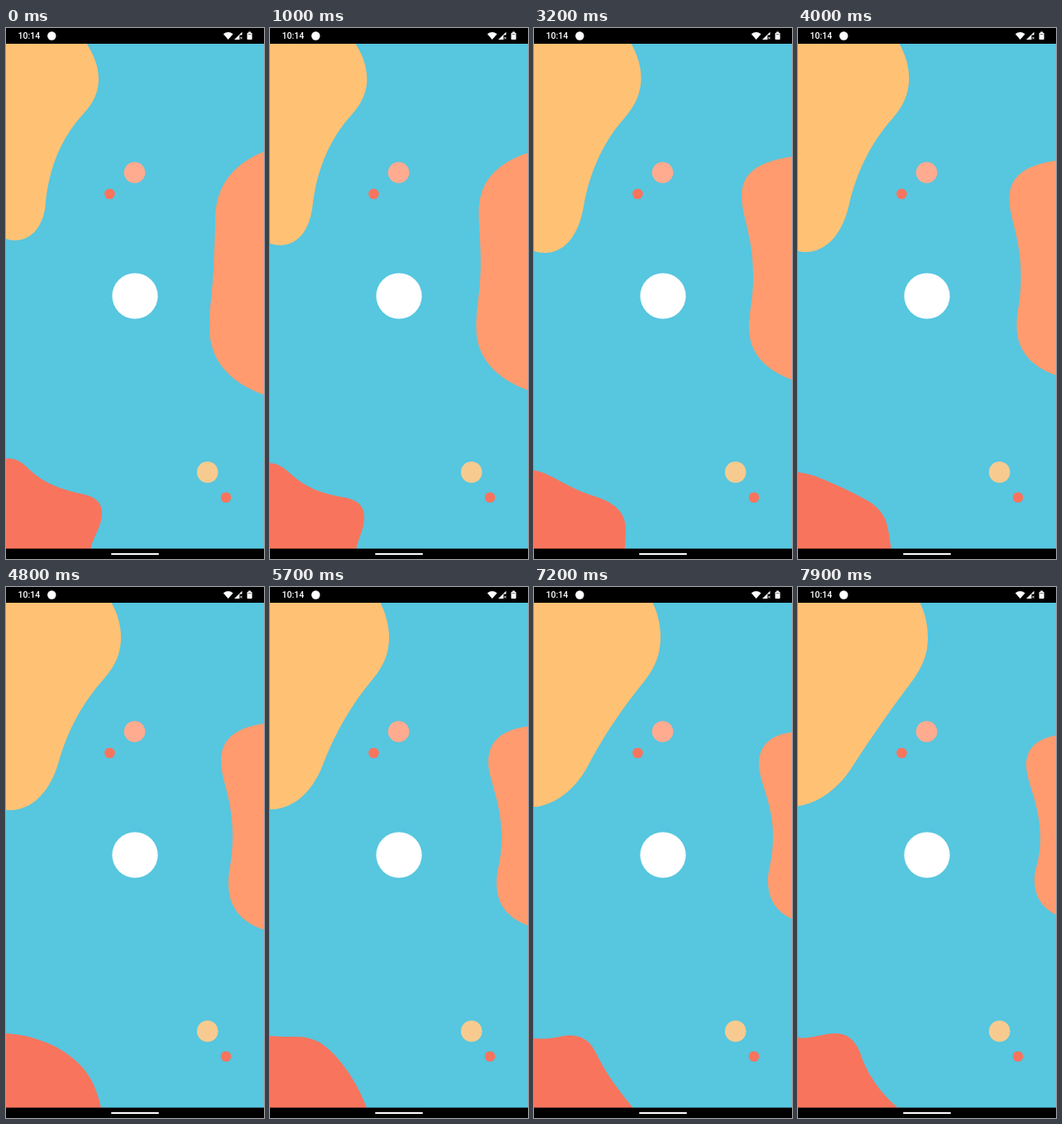
Write an HTML page that moves like this. It is 312 px wide and 640 px high and loops after 8 s.

```html
<!DOCTYPE html>
<html lang="en">
<head>
<meta charset="utf-8">
<title>Splash screen</title>
<style>
html, body { margin: 0; width: 100%; height: 100%; overflow: hidden; background: #57c6df; }
svg { display: block; width: 100%; height: 100%; }
.time { font: 500 10.5px Roboto, sans-serif; fill: #fff; }
.red { fill: #f9745d; }

/* Shapes advance in 100 ms ticks. */
.blob { animation: 8s infinite; }
.sun { fill: #ffc274; animation-name: sun; }
.peach { fill: #ff9b6e; animation-name: peach; }
.coral { fill: #f9745d; animation-name: coral; }

@keyframes sun {
  0% { animation-timing-function: steps(19);
    d: path("M0 18L97 18C106 32 112 46 112 62C112 78 105 91 94 103C66 133 52 170 48 210C46 238 32 256 10 256C6 256 3 255 0 254Z"); }
  23.75% { animation-timing-function: steps(13);
    d: path("M0 18L108 18C117 32 122 46 122 62C122 78 115 92 104 105C76 136 61 173 55 215C51 247 36 267 14 267C9 267 4 266 0 265Z"); }
  40% { animation-timing-function: steps(16);
    d: path("M0 18L117 18C125 32 129.5 46 129.5 60C129.5 79 122 94 109 109C83 138 67 175 60 215C54 250 37 271 13 271C8 271 4 270 0 269Z"); }
  60% { animation-timing-function: steps(9);
    d: path("M0 18L127 18C135 32 139 46 139 61C139 80 132 95 119 110C92 140 75 172 63 213C53 247 31 269 5 269C3 269 2 269 0 268.5Z"); }
  71.25% { animation-timing-function: steps(15);
    d: path("M0 18L133 18C140 32 144 46 144 61C144 80 137 96 125 110C99 141 79 175 64 214C52 246 30 266 4 268C3 268 1 268 0 268Z"); }
  90% { animation-timing-function: steps(7);
    d: path("M0 18L143 18C150 32 153 46 153 61C153 80 147 97 133 114C106 147 84 180 66 214C52 242 28 261 3 265C2 265 1 265 0 265Z"); }
  98.75%, 100% {
    d: path("M0 18L147 18C154 32 157 46 157 62C157 81 150 97 139 112C112 148 88 182 68 213C52 240 28 259 3 263.5C2 264 1 264 0 264Z"); }
}

@keyframes peach {
  0% { animation-timing-function: steps(19);
    d: path("M312 149C275 164 253 190 253 231C253 250 252 262 251 290C249 325 246 335 246 361C246 400 270 427 312 442Z"); }
  23.75% { animation-timing-function: steps(13);
    d: path("M312 152C273 162 252 182 252 213C252 232 258 255 258 290C258 325 252.5 335 252.5 361C252.5 396 276 418 312 432Z"); }
  40% { animation-timing-function: steps(16);
    d: path("M312 155C270 161 251 176 251 202C251 227 265 250 265 300C265 330 260 340 260 361C260 392 280 412 312 424Z"); }
  60% { animation-timing-function: steps(9);
    d: path("M312 164.5C276 170 260 184 260 210C260 232 274 255 274 300C274 330 269 340 269 357C269 386 284 404 312 413Z"); }
  71.25% { animation-timing-function: steps(15);
    d: path("M312 168C280 172 264 186 264 211C264 232 280 258 280 302C280 332 274 338 274 357C274 383 288 399 312 408Z"); }
  90% { animation-timing-function: steps(7);
    d: path("M312 175C285 178 272 192 272 213C272 235 289 260 289 300C289 330 283 338 283 354C283 377 293 391 312 400Z"); }
  98.75%, 100% {
    d: path("M312 179C287 183 276 196 276 215C276 235 293 262 293 303C293 330 286 338 286 353C286 374 296 387 312 395Z"); }
}

@keyframes coral {
  0% { animation-timing-function: steps(19);
    d: path("M0 519C10 518 18 522 28 532C46 549 68 557 94 562C110 566 116 573 116 585C116 600 107 610 102 628L0 628Z"); }
  23.75% { animation-timing-function: steps(13);
    d: path("M0 529C9 531 15 536 24 544C43 560 61 566 85 569C104 571 112 580 112 594C112 607 108 616 106 628L0 628Z"); }
  40% { animation-timing-function: steps(16);
    d: path("M0 533C12 535 22 541 35 548C50 556 62 561 78 566C101 574 111 587 111 605C111 614 110 620 110 628L0 628Z"); }
  60% { animation-timing-function: steps(9);
    d: path("M0 538C14 539 27 541 40 546C56 551 69 558 82 569C93 578 101 589 106 600C110 609 113 619 115 628L0 628Z"); }
  71.25% { animation-timing-function: steps(15);
    d: path("M0 541C10 542 20 542 32 542C48 542 60 547 72 558C86 571 96 586 104 600C109 609 113 618 117 628L0 628Z"); }
  90% { animation-timing-function: steps(7);
    d: path("M0 544C12 545 22 544 31 542C50 538 64 542 73 558C82 576 91 591 101 604C107 612 113 620 120 628L0 628Z"); }
  98.75%, 100% {
    d: path("M0 543C10 545 22 541 34 539C56 535 67 542 75 561C81 580 90 594 101 608C107 615 114 622 121 628L0 628Z"); }
}
</style>
</head>
<body>
<svg viewBox="0 0 312 640">
  <rect width="312" height="640" fill="#57c6df"/>
  <path class="blob sun"/>
  <path class="blob peach"/>
  <path class="blob coral"/>

  <circle cx="155.5" cy="174.3" r="12.8" fill="#ffab8f"/>
  <circle class="red" cx="125.4" cy="200" r="6.3"/>
  <circle cx="243.7" cy="535.4" r="12.8" fill="#f7cb90"/>
  <circle class="red" cx="266" cy="565.8" r="6.3"/>
  <circle cx="156" cy="323" r="27.6" fill="#fff"/>

  <!-- System bars -->
  <rect width="312" height="19"/>
  <rect y="627.5" width="312" height="12.5"/>
  <rect x="127" y="633" width="58" height="2" rx="1" fill="#fff"/>
  <text class="time" x="14.5" y="13.4">10:14</text>
  <g fill="#fff">
    <circle cx="55.3" cy="9.5" r="5.2"/>
    <path d="M262.8 7.2Q268.7 2.8 274.6 7.2L268.7 14Z"/>
    <path d="M276 14L285.5 4.8V8.6H282.4V14Z"/>
    <path d="M291.6 6.5Q291.6 5.7 292.4 5.7H293.3V4.6H295.9V5.7H296.8Q297.6 5.7 297.6 6.5V13.3Q297.6 14.1 296.8 14.1H292.4Q291.6 14.1 291.6 13.3Z"/>
  </g>
  <path d="M283.4 10.8L285.5 13.4M285.5 10.8L283.4 13.4" stroke="#fff" stroke-width=".8"/>
  <path d="M292.7 7.6H296.5" stroke="#777" stroke-width="1"/>
</svg>
</body>
</html>
```
